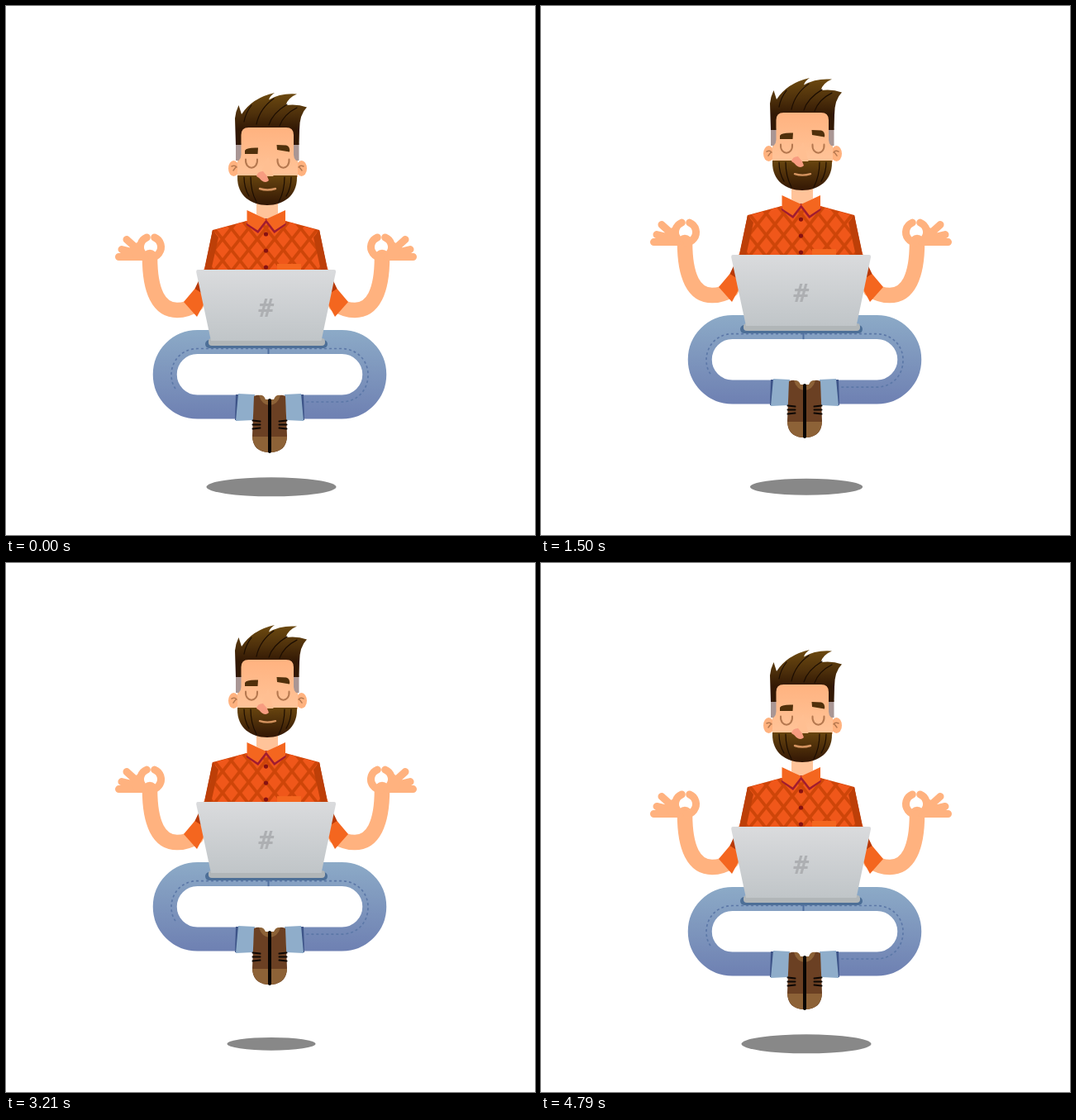
Animation, 640 px wide and 640 px high, one loop 4870 ms. Source, as an HTML page without scripts:

```html
<!DOCTYPE html>
<html lang="en">
<head>
<meta charset="utf-8">
<title>Floating meditation</title>
<style>
@property --step { syntax: '<number>'; inherits: true; initial-value: 0; }

html, body { margin: 0; width: 100%; height: 100%; overflow: hidden; background: #fff; }

/* The clock advances in 67 hard steps; each phase below runs from 0 to 1. */
svg {
  display: block; width: 100vw; height: 100vh;
  animation: clock 4.87s -15ms infinite;
  --rise1: calc((0.762 - cos(0.704 + 2.4376 * clamp(0, var(--step) / 13.5, 1))) / 1.762);
  --fall1: calc((1 - cos(3.1416 * clamp(0, (var(--step) - 13.5) / 14.5, 1))) / 2);
  --left2: calc(1 - clamp(0, (var(--step) - 28) / 23, 1));
  --rise2: calc((1 + cos(3.1416 * var(--left2) * var(--left2))) / 2);
  --fall2: calc(1 - cos(1.5708 * clamp(0, (var(--step) - 52) / 15, 1)));
}
@keyframes clock {
  0% { --step: 0; animation-timing-function: steps(67); }
  98.36%, 100% { --step: 67; }
}
.body {
  transform: translateY(calc(1px * (-44.5 * var(--rise1) + 50.5 * var(--fall1) - 36.3 * var(--rise2) + 30.3 * var(--fall2))));
}
.shadow {
  transform-origin: 321px 581.8px;
  transform: scale(calc(1 - .28 * var(--rise1) + .28 * var(--fall1) - .322 * var(--rise2) + .322 * var(--fall2)));
}

.line { fill: none; stroke-linecap: round; stroke-linejoin: round; }
.skin { stroke: #ffb27f; }
.strand { stroke: #1c0d02; stroke-width: 1.2; }
.hash { font: italic bold 30px "Open Sans", "Noto Sans", sans-serif; fill: #adafb2; text-anchor: middle; }
</style>
</head>
<body>
<svg viewBox="0 0 640 640">
  <defs>
    <linearGradient id="denim" gradientUnits="userSpaceOnUse" x1="0" y1="392" x2="0" y2="500">
      <stop stop-color="#8caac7"/><stop offset="1" stop-color="#6e80b2"/>
    </linearGradient>
    <linearGradient id="hair" x2="0" y2="1">
      <stop stop-color="#6d4a10"/><stop offset=".4" stop-color="#4e300b"/><stop offset=".7" stop-color="#321804"/>
    </linearGradient>
    <linearGradient id="beard" x2="0" y2="1">
      <stop stop-color="#68450f"/><stop offset="1" stop-color="#321604"/>
    </linearGradient>
    <linearGradient id="lid" x2="0" y2="1">
      <stop stop-color="#dadbdd"/><stop offset="1" stop-color="#c0c5c8"/>
    </linearGradient>
    <linearGradient id="face" x2="0" y2="1">
      <stop stop-color="#ffb27f"/><stop offset="1" stop-color="#ffc499"/>
    </linearGradient>
    <pattern id="argyle" patternUnits="userSpaceOnUse" x="304" y="269" width="21" height="26">
      <path id="diamond" fill="#f0571a" d="M10.5 3l8 10-8 10-8-10z"/>
      <use href="#diamond" x="-10.5" y="-13"/>
      <use href="#diamond" x="10.5" y="-13"/>
      <use href="#diamond" x="-10.5" y="13"/>
      <use href="#diamond" x="10.5" y="13"/>
    </pattern>

    <g id="arm">
      <path class="line skin" stroke-width="18.5" stroke-linecap="butt" d="M174 304C174 345 185 368 207 368C215 368 222 366 230 361"/>
      <path class="line skin" stroke-width="9" d="M170.3 280A12.5 12.5 0 1 0 179.7 280M165 303.5H136.500M163 300L140 294.500M161 296L146 282.500"/>
      <path fill="#ffb27f" d="M157 287l6-3 4 8-1 8 8 6-18 1-5-9z"/>
      <path fill="#b83a08" d="M250 271L240 318 228 343 245 356 258 320z"/>
      <path fill="#f4661f" d="M239 320l6-15 6 15zM228.500 342L244 352 231 376 215 358z"/>
    </g>

    <g id="shoe">
      <path fill="#6b4023" d="M300 472Q308 468 313 476H319V540C305 540 298 533 298 520z"/>
      <path fill="#8d6237" d="M298 521H319V540C306 540 299 533 298 521zM306 471Q312 470 314 476H319V483Q309 482 306 471z"/>
      <path class="line" stroke="#0d0805" stroke-width="2" d="M298.500 501.500l9 1M298.500 506.500h9M298.500 511.500l9-1"/>
    </g>

    <g id="cuff">
      <path fill="#3d5488" d="M278 470h5l-2 31h-4z"/>
      <path fill="#8fadca" d="M281 469l20 1-2 31-21 1z"/>
    </g>

    <g id="collar">
      <path fill="#a01c30" d="M291 261V265L305 275 315 262 315 257z"/>
      <path fill="#f4661f" d="M291.500 247L315 258 304.500 271.500 291.500 263z"/>
    </g>

    <g id="ear">
      <ellipse cx="275.500" cy="196.500" rx="6.500" ry="9.500" fill="#ffb27f"/>
      <path class="line" stroke="#b5784f" stroke-width="1.500" d="M273 194Q277 192 279 195M275 199L278 195"/>
    </g>
  </defs>

  <ellipse class="shadow" cx="321" cy="581.8" rx="78.500" ry="11.500" fill="#888"/>

  <g class="body">
    <!-- legs -->
    <path fill="none" stroke="url(#denim)" stroke-width="29" d="M281 485H231.500A39.250 39.250 0 0 1 231.500 406.500H406.500A39.250 39.250 0 0 1 406.500 485H358"/>
    <path fill="none" stroke="#5c78a8" stroke-width="1.700" stroke-dasharray="3 3" d="M317 414.500H232C212 414.500 200 430 200 446Q200 456 205 463M319 414.500H405C426 414.500 438 430 438 446C438 466 424 479 406 479H362"/>
    <path stroke="#4f6f9f" stroke-width="2" d="M317.500 411V421"/>
    <use href="#cuff"/>
    <use href="#cuff" transform="matrix(-1 0 0 1 638 0)"/>
    <use href="#shoe"/>
    <use href="#shoe" transform="matrix(-1 0 0 1 638 0)"/>
    <path class="line" stroke="#080503" stroke-width="4" d="M319 477V539"/>

    <!-- arms and shirt -->
    <use href="#arm"/>
    <use href="#arm" transform="matrix(-1 0 0 1 629 0)"/>
    <path id="shirt" fill="#ce4509" d="M250 271L291 260H338L379 271 386 325H243z"/>
    <path fill="url(#argyle)" d="M253 271L291 260H338L376 271 382 325H247z"/>
    <path fill="#bd3f08" d="M250 271L240 320H248L257 280zM379 271L389 320H381L372 280z"/>
    <path fill="#f4661f" d="M328 312h29v10h-29z"/>
    <path fill="#ffc399" d="M303 236h26v15l-14 8-12-7z"/>
    <use href="#collar"/>
    <use href="#collar" transform="matrix(-1 0 0 1 629.500 0)"/>
    <g fill="#861212">
      <circle cx="314.500" cy="276" r="2.600"/>
      <circle cx="314.500" cy="296" r="2.600"/>
      <circle cx="314.500" cy="316" r="2.600"/>
    </g>

    <!-- head -->
    <use href="#ear"/>
    <use href="#ear" transform="matrix(-1 0 0 1 633 0)"/>
    <path fill="url(#face)" d="M280 146H353V207H280z"/>
    <path fill="#a99694" d="M278 166h6.500v14q0 4-3 7H278zM354.500 166H348v14q0 4 3 7h3.500z"/>
    <path fill="url(#hair)" d="M278 168L277 136Q278 127 281.500 120L285 131Q298 111 325 105Q319 109 318 113.500Q332 105 352 106.500Q341 111 338.500 120Q352 118 364 122.500Q355 131 355 150L354.500 168H348V156Q348 147 339 147H293.500Q284.500 147 284.500 156V168z"/>
    <path class="line strand" d="M288 140Q290 129 297 120M303 143Q307 124 324 112M318 144Q322 130 340 119M331 145Q336 131 352 123"/>
    <path fill="#50300b" d="M289 175Q290 171 305 171.500L304.500 179H289zM327.500 168L339 168.500Q344 170 343 176.500L328 174z"/>
    <path class="line" stroke="#b5784f" stroke-width="2" d="M290 185.500C289 199 305 199 304 185.500M328.500 185.500C327.500 199 343.500 199 342.500 185.500"/>
    <path fill="url(#beard)" d="M280 205H352V208C352 229 336 241 316 241S280 229 280 208z"/>
    <path class="line strand" d="M288 207Q288 220 294 230M296 207Q296 224 303 237M337 207Q337 224 330 237M345 207Q345 220 339 230"/>
    <path fill="#ffbf92" d="M317 182L323.500 206H307z"/>
    <path fill="#f79c80" d="M303 206Q304 200 311 200L316 206 318 211Q314 215 309 211Q307 208 303 206z"/>
    <path class="line" stroke="#d4935f" stroke-width="2.400" d="M307 221Q316 224 326 221"/>

    <!-- laptop -->
    <rect x="241" y="404" width="148" height="10" rx="5" fill="#4d6f97"/>
    <rect x="245" y="402" width="141" height="9" rx="4" fill="#b1b6b8"/>
    <path fill="url(#lid)" d="M232 319H397Q399.500 319 399 322L381.500 405H248L230.200 322Q230 319 232 319z"/>
    <text class="hash" x="314.500" y="376">#</text>
  </g>
</svg>
</body>
</html>
```
